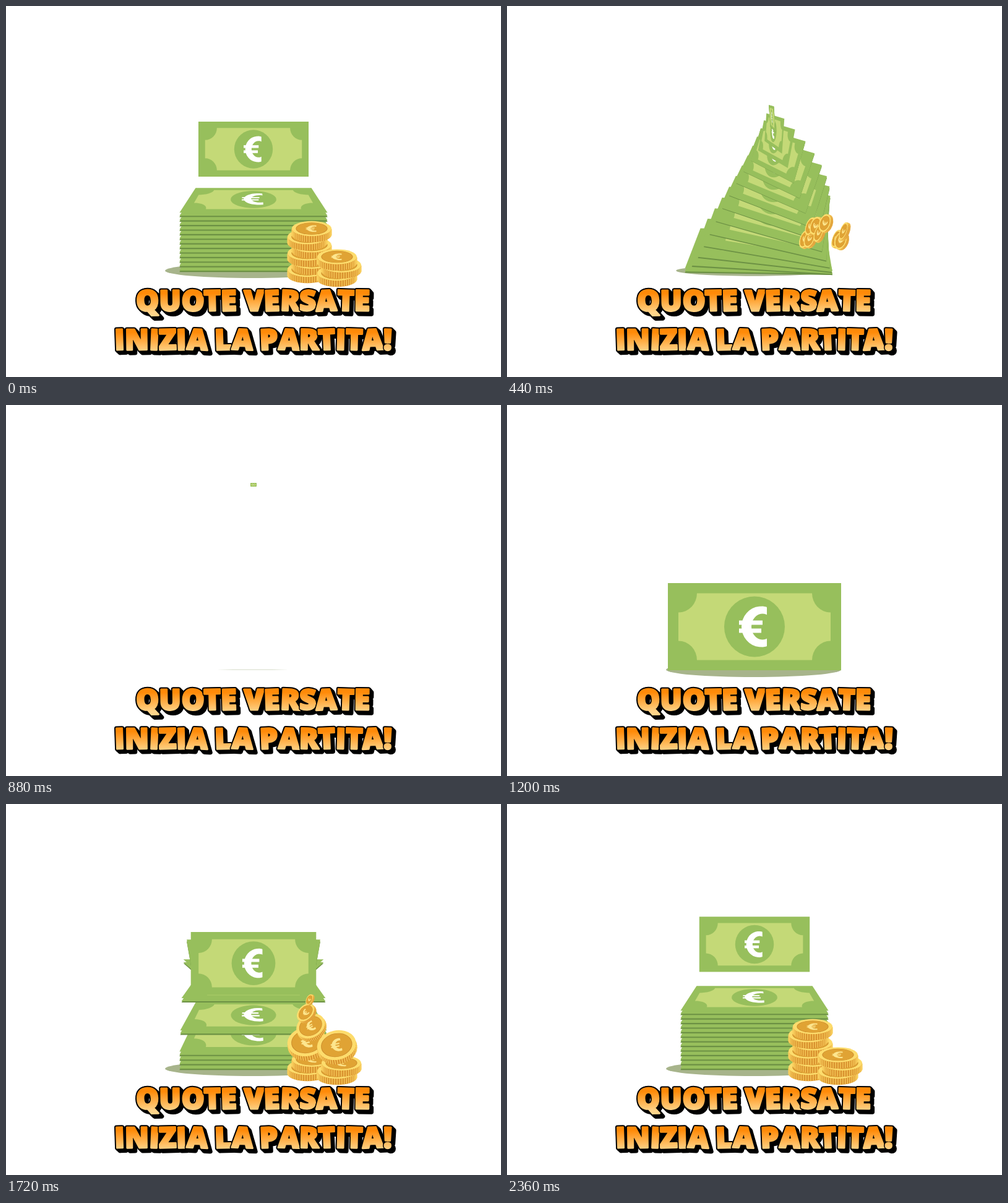
An HTML page with a canvas that plays this animation: 800x600 px, repeating every 2.44 s.

```html
<!DOCTYPE html>
<html lang="it">
<head>
<meta charset="utf-8">
<style>
html, body { margin: 0; width: 800px; height: 600px; overflow: hidden; background: #fff; }
canvas { display: block; }
</style>
</head>
<body>
<canvas id="stage" width="800" height="600"></canvas>
<script>
const ctx = document.getElementById('stage').getContext('2d');
const LOOP = 2440, STEP = 40, FOCAL = 430, HORIZON = 150.4, BILLS = 13, RAD = Math.PI / 180;
const GREEN = '#97bf5c', PALE = '#c4d977', DARK = '#6c9144';

const clamp = v => Math.max(0, Math.min(1, v));
const mix = (a, b, k) => a + (b - a) * k;
const smooth = v => (v = clamp(v), v * v * (3 - 2 * v));
const arch = v => Math.sin(Math.PI * clamp(v));

// Points of an elliptic arc, angles in degrees
function arc(cx, cy, rx, ry, from, to, n = 20) {
  return Array.from({ length: n + 1 }, (_, i) => {
    const a = mix(from, to, i / n) * RAD;
    return [cx + rx * Math.cos(a), cy + ry * Math.sin(a)];
  });
}
const box = (x, y, w, h) => [[x, y], [x + w, y], [x + w, y + h], [x, y + h]];

// Bill artwork around its own centre
const SHEET = box(-140, -70, 280, 140);
const PANEL = box(-123, -54, 246, 108).flatMap(([x, y], i) => arc(x, y, 30, 31, 90 * (i + 1), 90 * i, 8));
const DISC = arc(0, 0, 49, 49, 0, 360, 36);
const EURO = [
  [[20, 31], ...arc(11, 0, 32, 33, 75, 285), [20, -31], [20, -19], ...arc(13, 0, 18, 21, 290, 70), [20, 19]],
  box(-25, -10, 38, 7), box(-25, 3, 36, 7)
];

function fillPoly(points, color, place, dy = 0) {
  ctx.beginPath();
  for (const [u, v] of points) {
    const [x, y] = place(u, v);
    ctx.lineTo(x, y + dy);
  }
  ctx.fillStyle = color;
  ctx.fill();
}

function projector({ x, y, s, pitch, yaw = 0, roll = 0 }) {
  const [sp, cp, sy, cy, sr, cr] =
    [pitch, yaw, roll].flatMap(a => [Math.sin(a * RAD), Math.cos(a * RAD)]);
  return (u, v) => {
    const py = v * cp, pz = -v * sp;
    const px = u * cy + pz * sy, z = pz * cy - u * sy;
    const k = FOCAL / (FOCAL / s + z);
    return [400 + ((x - 400) / s + px * cr - py * sr) * k,
      HORIZON + ((y - HORIZON) / s + px * sr + py * cr) * k];
  };
}

function drawBill(pose) {
  const place = projector(pose);
  const edge = 9.6 * pose.s * Math.abs(Math.sin(pose.pitch * RAD));
  if (edge > .3) {
    fillPoly(SHEET, DARK, place, edge);
    fillPoly(SHEET, GREEN, place, edge * .7);
  }
  fillPoly(SHEET, GREEN, place);
  fillPoly(PANEL, PALE, place);
  fillPoly(DISC, GREEN, place);
  EURO.forEach(part => fillPoly(part, '#fff', place));
}

const restY = k => 311.7 + 6.5 * (k - 1);

// Bill 0 hovers; 1 to 13 lie in the pile from top to bottom
function flyAway(k, t) {
  const p = clamp((t - 170 - 20 * k) / 430);
  return p < 1 && {
    x: 400 + 34 * arch(p ** .8),
    y: mix(k ? restY(k) : 231.5 + .12 * t, 127, smooth(p) ** 1.1),
    s: Math.max(.02, (k ? .75 : .636) * (1 - p ** 1.2)),
    pitch: (90 - 160 * p) * (k ? 1 : smooth(4 * p)),
    yaw: 180 * p ** 1.55,
    roll: 7 * arch(p)
  };
}

function comeBack(t) {
  const e = smooth((t - 860) / 300);
  return { x: 400, y: mix(126, 358.5, e), s: mix(.02, 1, e), pitch: 0 };
}

function pileUp(k, t) {
  const ahead = (1 - (t - 1200) / 1360) ** 3;
  const phase = k ? t - 1980 + 65 * (k - 1) : 0;
  const drop = smooth((phase - 100) / 230);
  return {
    x: 400,
    y: mix(226.5 + 132 * ahead, restY(k), drop),
    s: mix(.636 + .364 * ahead, .75, drop),
    pitch: -90 * clamp(phase / 180)
  };
}

const billPose = (k, t) => t < 880 ? flyAway(k, t) : t < 1200 ? comeBack(t) : pileUp(k, t);

function coinLeaving(x, y, j, height, i, t) {
  const leave = 290 - 220 * height * height;
  const p = Math.max(0, (t - leave) / (600 - leave)), turn = smooth(2 * p);
  return {
    x: mix(x, 474 + 9 * i, smooth(p)),
    y: mix(y, 390 + 15 * Math.sin(2 * i), smooth(p)) - 32 * arch(p),
    r: mix(32, 15, turn) * clamp((760 - t) / 160),
    roll: -70 * turn,
    ratio: mix(.38, .5 + .15 * Math.sin(3 * i), turn)
  };
}

function coinArriving(x, y, j, t) {
  const q = clamp((t - 1210 - 82 * j) / 400), away = 1 - q;
  return {
    x: x - 5 * away,
    y: y - 52 * away ** .6,
    r: 32 * Math.min(1, q * 1.15),
    roll: -85 * away,
    ratio: .38 + .4 * arch(Math.sqrt(away))
  };
}

function drawCoin({ x, y, r, roll, ratio }) {
  if (r <= 0) return;
  const depth = r * .34 * Math.sqrt(1 - ratio * ratio);
  const oval = (k, dy, color) => {
    ctx.beginPath();
    ctx.ellipse(0, dy, r * k, r * k * ratio, 0, 0, 7);
    ctx.fillStyle = color;
    ctx.fill();
  };
  ctx.save();
  ctx.translate(x, y);
  ctx.rotate(roll * RAD);
  oval(1, depth, '#d9922f');
  ctx.fillRect(-r, 0, 2 * r, depth);
  ctx.beginPath();
  for (const [px, py] of arc(0, 0, r, r * ratio, 4, 176, 24)) {
    ctx.moveTo(px, py);
    ctx.lineTo(px, py + depth);
  }
  ctx.strokeStyle = '#f8cd5c';
  ctx.lineWidth = r / 24;
  ctx.stroke();
  oval(1, 0, '#fddc6c');
  oval(.8, 0, '#c98a2b');
  oval(.77, 0, '#e0a334');
  EURO.forEach(part => fillPoly(part, '#fde68e', (u, v) => [u * r / 85, v * r * ratio / 75]));
  ctx.restore();
}

function drawColumn(baseX, baseY, count, first, t) {
  for (let j = 0; j < count; j++) {
    const x = baseX + (j % 2 ? 4 : -3), y = baseY - 13.2 * j;
    drawCoin(t < 1200
      ? coinLeaving(x, y, j, j / (count - 1), first + j, t)
      : coinArriving(x, y, j, t));
  }
}

function drawShadow(t) {
  const gone = t < 850 ? clamp((t - 320) / 440) : 1 - smooth((t - 860) / 300);
  ctx.beginPath();
  ctx.ellipse(398.5, 428, 141.5 * (1 - gone * .42), 12 * (1 - gone), 0, 0, 7);
  ctx.fillStyle = '#a7b48b';
  ctx.fill();
}

function drawTitle(text, baseline) {
  ctx.font = '800 46.5px "Open Sans", sans-serif';
  ctx.textAlign = 'center';
  ctx.lineJoin = 'round';
  const orange = ctx.createLinearGradient(0, -36, 0, 3);
  orange.addColorStop(.2, '#ff8a08');
  orange.addColorStop(1, '#ffd58a');
  let x = 397 - ctx.measureText(text).width / 2;
  const letters = [...text].map((char, i) => {
    const w = ctx.measureText(char).width;
    x += w;
    return { char, x: x - w / 2, tilt: 2.5 * Math.sin(i * 2 + 4) * RAD };
  });
  const each = paint => letters.forEach(l => {
    ctx.save();
    ctx.translate(l.x, baseline);
    ctx.rotate(l.tilt);
    paint(l.char);
    ctx.restore();
  });
  const outline = (char, color, width, d = 0) => {
    ctx.strokeStyle = color;
    ctx.lineWidth = width;
    ctx.strokeText(char, d, d);
  };
  each(char => { for (let d = 0; d < 6; d++) outline(char, '#000', 7, d); });
  each(char => {
    outline(char, '#000', 6);
    outline(char, orange, 3);
    ctx.fillStyle = orange;
    ctx.fillText(char, 0, 0);
  });
}

function draw(t) {
  ctx.fillStyle = '#fff';
  ctx.fillRect(0, 0, 800, 600);
  drawShadow(t);
  for (let k = BILLS; k >= 0; k--) {
    const pose = billPose(k, t);
    if (pose) drawBill(pose);
  }
  drawColumn(490, 426, 6, 0, t);
  drawColumn(538, 432, 3, 6, t);
  drawTitle('QUOTE VERSATE', 493);
  drawTitle('INIZIA LA PARTITA!', 556);
}

const began = performance.now();
function tick() {
  const t = (performance.now() - began) % LOOP;
  draw(Math.min(LOOP - 80, Math.floor(t / STEP) * STEP));
  requestAnimationFrame(tick);
}
tick();
</script>
</body>
</html>
```
